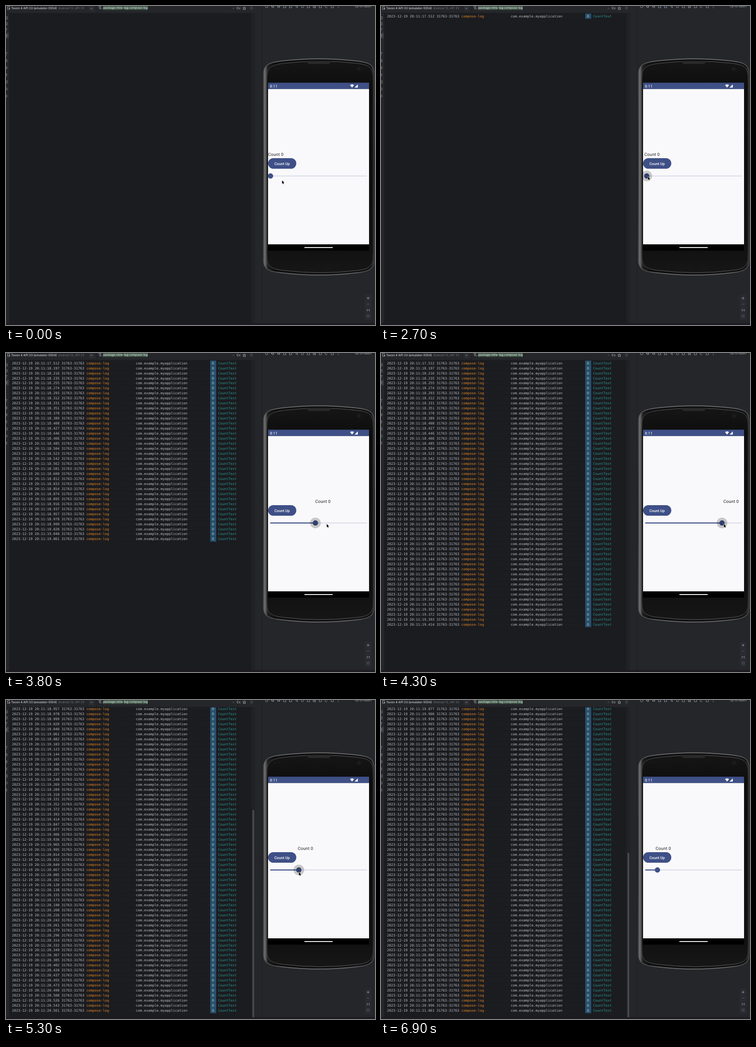
An HTML page with a canvas for the animation above (7 s loop, 804x696 px).

```html
<!DOCTYPE html>
<html lang="en">
<head>
<meta charset="utf-8">
<title>Slider log</title>
<style>
html, body { margin: 0; width: 100%; height: 100%; overflow: hidden; background: #25262a; }
canvas { display: block; }
</style>
</head>
<body>
<canvas id="stage" width="804" height="696"></canvas>
<script>
const ctx = document.getElementById('stage').getContext('2d');
const LOOP = 7000, STEP = 100, ROW = 10.967, LOG_START = 15266;
const PRESS = 2200, RELEASE = 5800;
const PRIMARY = '#3f5087', PANEL = '#25262a', EDITOR = '#1b1c20', ICON = '#a9abb2', DIM = '#62646a';
const MONO = '7.475px "DejaVu Sans Mono", monospace';
const ui = (size, weight = 400) => `${weight} ${size}px Inter, sans-serif`;
const roboto = (size, weight = 400) => `${weight} ${size}px Roboto, sans-serif`;

// Each slider movement logs a run of evenly spaced entries
const run = (from, to, count) =>
  Array.from({ length: count }, (_, i) => Math.round(from + (to - from) * i / Math.max(1, count - 1)));
const stamps = [
  ...run(17512, 17512, 1), ...run(18197, 18600, 22), ...run(18812, 19414, 30),
  ...run(19847, 19995, 6), ...run(20014, 20561, 32), ...run(20578, 20996, 23), ...run(21061, 21061, 1)
];

// Key points: [time, value, ...]
const thumbKeys = [[2200, 576.3], [2240, 579], [2900, 579], [3340, 621], [3530, 621],
  [4150, 743], [4580, 743], [4800, 720], [5300, 638], [RELEASE, 602.3]];
const cursorKeys = [[300, 601.5, 380.5], [1600, 586, 371], [PRESS, 580, 372], [2850, 582, 372],
  [3300, 630, 373], [4150, 747, 373], [4550, 747, 373], [4800, 713.7, 374], [5300, 638.3, 375.5], [RELEASE, 602, 376]];

function track(keys, t) {
  const i = keys.findIndex(k => k[0] > t);
  if (i === 0) return keys[0].slice(1);
  if (i < 0) return keys[keys.length - 1].slice(1);
  const a = keys[i - 1], b = keys[i], p = (t - a[0]) / (b[0] - a[0]);
  return a.slice(1).map((v, n) => v + (b[n + 1] - v) * p);
}
const ramp = (t, from, duration) => Math.min(1, Math.max(0, (t - from) / duration));

function rect(x, y, w, h, color) {
  ctx.fillStyle = color;
  ctx.fillRect(x, y, w, h);
}
function pill(x, y, w, h, r, color) {
  ctx.fillStyle = color;
  ctx.beginPath();
  ctx.roundRect(x, y, w, h, r);
  ctx.fill();
}
function dot(x, y, r, color) {
  ctx.fillStyle = color;
  ctx.beginPath();
  ctx.arc(x, y, r, 0, 7);
  ctx.fill();
}
function text(str, x, y, font, color, spacing = 0, align = 'left') {
  ctx.font = font;
  ctx.fillStyle = color;
  ctx.textAlign = align;
  ctx.letterSpacing = spacing + 'px';
  ctx.fillText(str, x, y);
}
function line(d, color = ICON, width = 0.8, x = 0, y = 0) {
  ctx.save();
  ctx.translate(x, y);
  ctx.strokeStyle = color;
  ctx.lineWidth = width;
  ctx.stroke(new Path2D(d));
  ctx.restore();
}
function shape(d, color, x = 0, y = 0) {
  ctx.save();
  ctx.translate(x, y);
  ctx.fillStyle = color;
  ctx.fill(new Path2D(d));
  ctx.restore();
}
function gradient(x0, y0, x1, y1, ...stops) {
  const g = ctx.createLinearGradient(x0, y0, x1, y1);
  stops.forEach(([p, c]) => g.addColorStop(p, c));
  return g;
}

const BOX = 'M-2.5-2.5h5v5h-5z', RING = 'M2.6 0a2.6 2.6 0 1 1-5.2 0a2.6 2.6 0 1 1 5.2 0';
const BACK = 'M2-2.6L-2 0L2 2.6z', BARS = 'M-2.5-2h5M-2.5 0h5M-2.5 2h5';
const TURN = 'M2 1.5A2.6 2.6 0 1 1 2-1.5M2-3v1.8h-1.8', SPEAK = 'M-2.5-1h1.5l2-1.7v5.4l-2-1.7h-1.5zM2.5-1.5v3';
const STAR = 'M0-3.3l1 2.2l2.4.2l-1.8 1.6l.6 2.4l-2.2-1.3l-2.2 1.3l.6-2.4l-1.8-1.6l2.4-.2z';
const ARROW = 'M0 0V7.2L1.6 5.7L2.7 8.3L3.9 7.8L2.8 5.3H5Z';

function drawToolbars() {
  line('M3.5 1h4v2M3.5 1v6.5h2', ICON, 0.9);
  pill(6, 4, 3, 3.6, 0.6, '#8d9096');
  text('Tavon 4 API 33 (emulator-5554)', 11.3, 7.2, ui(6.5, 500), '#d2d4da');
  text('Android 13, API 33', 114, 7.2, ui(6.5), '#74767d');
  pill(181, -3, 11, 14, 2, '#2d2e33');
  line('M184 4l2.2 2.2l2.2-2.2');
  rect(197, 0, 1, 15, '#1d1e22');
  line('M202 1.5h5.5l-2 2.5v3l-1.5-1v-2zM207 6h2.5');
  rect(211.5, 0, 42.5, 8.5, '#41594a');
  rect(256, 0, 53, 8.5, '#41594a');
  text('package:mine', 212, 6.4, ui(6.4, 500), '#e6e9e6');
  text('tag:compose-log', 256.3, 6.4, ui(6.4, 500), '#e6e9e6');
  line('M494 3.5l3 3m0-3l-3 3', DIM);
  text('Cc', 502.5, 7.4, ui(6.8, 500), '#b9bbc1');
  line(STAR, '#c2c4ca', 0.8, 519.3, 5);
  line(RING, DIM, 0.8, 535, 4.5);
  text('?', 535, 6.6, ui(5), DIM, 0, 'center');

  // Icon rail, cut by the left edge
  rect(0, 58.5, 6, 12, '#3a3c41');
  [BOX, BOX, TURN, BARS].forEach((d, i) => line(d, '#92949a', 0.8, 0, 26 + 12.8 * i));
  [TURN, BACK, BACK, BARS, BOX, RING, BARS].forEach((d, i) => line(d, '#92949a', 0.8, 0, 104 + 15.4 * i));

  [RING, SPEAK, SPEAK, BOX, BOX, BACK, RING, BOX, BOX, BOX, TURN, BOX]
    .forEach((d, i) => line(d, ICON, 0.8, 568 + 13 * i, 1.3));
  line('M609 0v4M618 0v4', '#4879c9');
  dot(672, 1.4, 1, ICON);
  for (let i = 0; i < 3; i++) dot(724, 2.4 * i - 0.8, 0.65, ICON);
  text('Up-to-date', 760, 3.4, ui(6.2), '#a2a4aa');
  line('M793 .5l1.7 2l3-4', '#57965c', 1);
}

function drawZoom() {
  pill(782, 630, 14, 55, 2, '#2a2b30');
  line('M786 637.5h6M789 634.5v6');
  line('M786 650.5h6', DIM);
  text('1:1', 789, 666, ui(5.8, 600), '#b4b6bc', 0, 'center');
  line('M786.5 674h5v5h-5zM787 678.5l4-4', DIM, 0.7);
}

const body = new Path2D('M560.5 150C560.5 127 575 123 600 120Q682 110.5 765 120C790 123 802.5 127 802.5 150' +
  'V555C802.5 575 787 580 765 582Q682 592 600 582C576 580 560.5 575 560.5 555Z');

function drawPhone() {
  ctx.fillStyle = gradient(560, 0, 803, 0, [0, '#2a2a2a'], [0.012, '#707070'], [0.022, '#606060'],
    [0.042, '#202020'], [0.1, '#101010'], [0.97, '#141414'], [0.988, '#303030'], [1, '#1a1a1a']);
  ctx.fill(body);
  ctx.lineWidth = 1.4;
  ctx.strokeStyle = gradient(0, 115, 0, 587, [0, '#808182'], [0.07, '#404041'], [0.5, '#2d2d2e'],
    [0.95, '#484849'], [1, '#7c7c7d']);
  ctx.stroke(body);

  // The glass sits right of centre, leaving the lit left side visible
  ctx.save();
  ctx.translate(684.2, 351);
  ctx.scale(0.953, 0.978);
  ctx.translate(-681.5, -351);
  ctx.fillStyle = gradient(0, 120, 0, 585, [0, '#151515'], [0.12, '#0d0d0d'], [0.88, '#111'], [1, '#161616']);
  ctx.fill(body);
  ctx.lineWidth = 1;
  ctx.strokeStyle = gradient(0, 120, 0, 585, [0, '#5a5a5a'], [0.1, '#292929'], [0.9, '#292929'], [1, '#626262']);
  ctx.stroke(body);
  ctx.restore();
  shape('M653 120.5Q682 119 709 120.5L704 126.5H659Z', '#29292a');
  dot(769, 137, 6, '#171718');
  dot(769, 137, 3, '#1e1e20');
  dot(587, 137, 2, '#19191a');
  dot(595, 137, 2, '#19191a');

  rect(571, 167.3, 220, 366.4, '#000');
  rect(571, 167.3, 220, 14, PRIMARY);
  rect(571, 181.2, 220, 338.8, '#f9f9fb');
  text('8:11', 575, 177.8, roboto(8.3), '#fff', 0.1);
  shape('M749.7 172.6Q754 169.4 758.3 172.6L754 178Z', '#fff');
  shape('M766.5 171v7h-7z', '#fff');
  pill(650, 526, 62, 2, 1, '#f1f1f1');
}

function drawApp(t) {
  const [thumb] = track(thumbKeys, t);
  const halo = ramp(t, PRESS, 150) - ramp(t, RELEASE, 200);
  text('Count 0', 571 + (thumb - 576.3) * 1.05, 327.3, roboto(9.17), '#1b1b1f', 0.286);
  pill(571, 332, 61.5, 23, 11.5, PRIMARY);
  text('Count Up', 601.6, 346.5, roboto(8.02, 500), '#fff', 0.057, 'center');
  pill(575.3, 369.7, 211.3, 2.3, 1.15, '#dddeea');
  pill(575.3, 369.7, thumb - 575.3, 2.3, 1.15, PRIMARY);
  dot(thumb, 370.8, 5.8, PRIMARY);
  dot(thumb, 370.8, 11.6, `rgba(0,0,0,${0.2 * halo})`);
  if (t < 6500) {
    const [x, y] = track(cursorKeys, t);
    line(ARROW, '#fff', 1, x, y);
    shape(ARROW, '#000', x, y);
  }
}

function drawLog(t) {
  const count = stamps.filter(s => s <= LOG_START + t).length;
  const scroll = Math.max(0, 22 + (count - 1) * ROW - 677.5);
  ctx.save();
  ctx.beginPath();
  ctx.rect(7, 16, 537, 676);
  ctx.clip();
  for (let i = 0; i < count; i++) {
    const y = 22 + i * ROW - scroll, base = y + 2.6;
    if (y < 8) continue;
    const stamp = (stamps[i] / 1000).toFixed(3);
    rect(445, y - ROW / 2, 13, ROW + 0.3, '#28516d');
    text(`2023-12-19 20:11:${stamp} 31763-31763`, 13, base, MONO, '#bcbec4');
    text('compose-log', 175, base, MONO, '#e08424');
    text('·'.repeat(13), 224.5, base, MONO, '#2e2f34');
    text('com.example.myapplication', 282.8, base, MONO, '#bcbec4');
    text('·'.repeat(10), 398, base, MONO, '#2e2f34');
    text('D', 451.3, base, MONO, '#b5cbd6', 0, 'center');
    text('CountText', 462, base, MONO, '#2a9691');
  }
  if (scroll) {
    const height = 674 * 674 / (674 + scroll);
    rect(537, 692 - height, 4, height, '#47484c');
  }
  ctx.restore();
}

function draw(t) {
  ctx.textRendering = 'geometricPrecision';
  rect(0, 0, 804, 696, PANEL);
  rect(7, 16, 528, 676, EDITOR);
  rect(0, 15, 543, 1, '#1d1e22');
  rect(535, 16, 8, 676, '#212226');
  rect(557, 0, 1, 692, '#1d1e22');
  rect(0, 692, 804, 4, '#1d1b21');
  drawToolbars();
  drawLog(t);
  drawZoom();
  drawPhone();
  drawApp(t);
}

const start = performance.now();
function frame() {
  const t = (performance.now() - start) % LOOP;
  draw(Math.floor(t / STEP) * STEP);
  requestAnimationFrame(frame);
}
frame();
</script>
</body>
</html>
```
